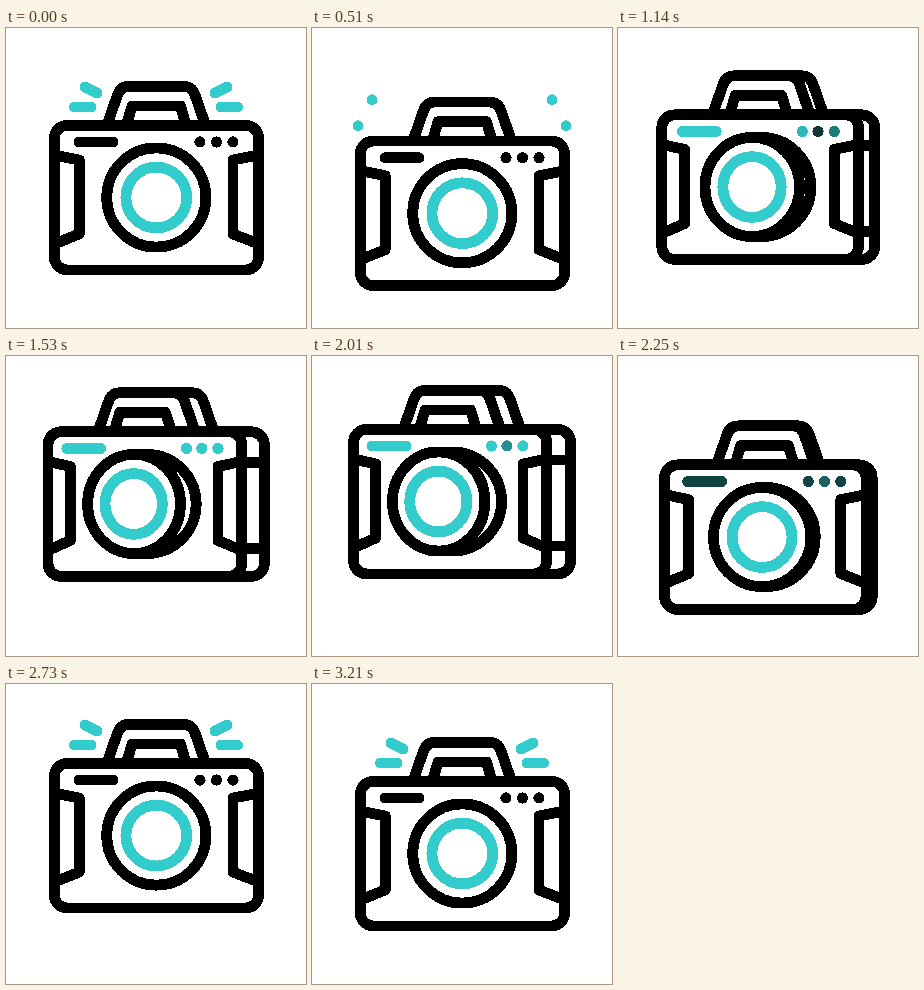
An HTML page that plays this animation: 300 by 300 pixels, repeating every 3.54 s.

```html
<!DOCTYPE html>
<html lang="en">
<head>
<meta charset="utf-8">
<title>Camera</title>
<style>
  html, body { margin: 0; width: 100%; height: 100%; overflow: hidden; background: #fff; }
  svg { display: block; width: 100vw; height: 100vh; shape-rendering: crispEdges; }
  .ink { fill: none; stroke: #000; stroke-width: 10.8; stroke-linecap: round; stroke-linejoin: round; }
  .solid { fill: #fff; }
  .accent { stroke: #33cccc; }
</style>
</head>
<body>
<svg viewBox="0 0 300 300">
  <g id="flash"></g>
  <g id="camera">
    <path id="hoodBack" class="ink solid"/>
    <path id="hoodFront" class="ink solid"/>
    <path id="hoodInner" class="ink"/>
    <rect id="bodyBack" class="ink solid" y="97.3" height="144.6" rx="13"/>
    <path id="sideLines" class="ink"/>
    <rect id="bodyFront" class="ink solid" y="97.3" height="144.6" rx="13"/>
    <path id="panels" class="ink"/>
    <circle id="lensBack" class="ink solid" cy="169.5" r="49.6"/>
    <ellipse id="lensFront" class="ink solid" cy="169.5" ry="49.6"/>
    <ellipse id="lensInner" class="ink accent" cy="169.5" ry="30.4"/>
    <path id="bar" class="ink"/>
    <circle id="dot0" cy="114" r="5.6"/>
    <circle id="dot1" cy="114" r="5.6"/>
    <circle id="dot2" cy="114" r="5.6"/>
  </g>
</svg>
<script>
const LOOP = 3540, STEP = 30;
const SVG = 'http://www.w3.org/2000/svg';
const $ = id => document.getElementById(id);
const set = (id, attrs) => {
  for (const name in attrs) $(id).setAttribute(name, attrs[name]);
};

// Smooth interpolation through [time, value] keys that never overshoots them.
function track(keys) {
  const slope = i => (keys[i + 1][1] - keys[i][1]) / (keys[i + 1][0] - keys[i][0]);
  const tangent = i => {
    if (i === 0 || i === keys.length - 1) return 0;
    const a = slope(i - 1), b = slope(i);
    return a * b <= 0 ? 0 : 2 * a * b / (a + b);
  };
  return t => {
    const last = keys.length - 1;
    if (t <= keys[0][0]) return keys[0][1];
    if (t >= keys[last][0]) return keys[last][1];
    const i = keys.findIndex(k => k[0] > t) - 1;
    const [t0, v0] = keys[i], [t1, v1] = keys[i + 1];
    const h = t1 - t0, u = (t - t0) / h, u2 = u * u, u3 = u2 * u;
    return v0 * (2 * u3 - 3 * u2 + 1) + v1 * (3 * u2 - 2 * u3)
      + h * (tangent(i) * (u3 - 2 * u2 + u) + tangent(i + 1) * (u3 - u2));
  };
}

const lift = track([[300, 0], [570, 18], [810, 13], [1140, -10.5], [1350, -17.5], [1740, -24],
  [2010, -24], [2370, 24], [2430, 21], [2460, 17], [2715, -18], [2970, -9], [3210, 0]]);
const barGlow = track([[810, 0], [1140, 1], [2010, 1], [2400, 0]]);
const dotGlow = [
  track([[810, 0], [1140, 0.9], [1200, 1], [2010, 1], [2400, 0]]),
  track([[840, 0], [1140, 0.27], [1560, 1], [1740, 1], [2010, 0.7], [2460, 0.3], [2730, 0]]),
  track([[840, 0], [1140, 0.6], [1320, 1], [2010, 1], [2400, 0]])
];
const flyOuter = track([[300, 0], [510, 1], [540, 1.05]]);
const flyInner = track([[300, 0], [420, 0.4], [510, 1], [540, 1.05]]);
const grow = track([[2460, 0], [2700, 1]]);

const clamp = v => Math.max(0, Math.min(1, v));
const turn = t => t < 570 ? 0
  : t < 2010 ? clamp((18 - lift(t)) / 42)
  : t < 2370 ? clamp((24 - lift(t)) / 48) : 0;
const teal = k => `rgb(${51 * k},${204 * k},${204 * k})`;
const mix = (a, b, k) => a.map((v, i) => v + (b[i] - v) * k);

// Left-hand rays; each is mirrored to the right.
const rays = [
  { outer: [79, 59], inner: [91, 65], exit: [60, 56] },
  { outer: [68.5, 79], inner: [85, 79], exit: [46, 82] }
];
for (const ray of rays) {
  ray.paths = [0, 1].map(side => {
    const path = document.createElementNS(SVG, 'path');
    path.setAttribute('class', 'ink accent');
    if (side) path.setAttribute('transform', 'matrix(-1 0 0 1 300 0)');
    return $('flash').appendChild(path);
  });
}

function drawFlash(t) {
  const visible = t <= 540 || t >= 2460;
  $('flash').setAttribute('visibility', visible ? 'visible' : 'hidden');
  for (const { outer, inner, exit, paths } of rays) {
    const a = t < 1000 ? mix(outer, exit, flyOuter(t)) : mix(inner, outer, grow(t));
    const b = t < 1000 ? mix(inner, exit, flyInner(t)) : inner;
    for (const path of paths) path.setAttribute('d', `M${a}L${b}`);
  }
}

function hood(left, right) {
  return `M${left} 97L${left + 10.5} 67Q${left + 13.5} 58.3 ${left + 22} 58.3`
    + `H${right - 22}Q${right - 13.5} 58.3 ${right - 10.5} 67L${right} 97`;
}

function draw(t) {
  const p = turn(t), y = lift(t);
  const at = (x, shift) => x + shift * p;
  const left = at(48.3, -6.7), right = at(252.7, -18), back = at(252.7, 6);
  const hoodLeft = at(101, -9.5);

  $('camera').setAttribute('transform', `translate(0 ${y})`);
  $('flash').setAttribute('transform', `translate(0 ${y})`);
  drawFlash(t);

  set('hoodBack', { d: hood(hoodLeft, at(199.5, 9)) });
  set('hoodFront', { d: hood(hoodLeft, at(199.5, -11)) });
  set('hoodInner', { d: `M${at(120.5, -13)} 97L${at(126, -13)} 78H${at(174.5, -16)}L${at(180, -15.5)} 97` });
  set('bodyBack', { x: left, width: back - left });
  set('bodyFront', { x: left, width: right - left });
  set('sideLines', { d: `M${right} 128H${back}M${right} 214H${back}` });

  const panelL = at(73.2, -9.5), panelR = at(227, -16);
  set('panels', {
    d: `M${left} 127L${panelL} 132V206L${left} 216M${right} 127L${panelR} 132V206L${right} 216`
  });

  const lensLeft = at(100.7, -20.3), lensRight = at(199.9, -27);
  set('lensBack', { cx: at(150.3, -10.3) });
  set('lensFront', { cx: (lensLeft + lensRight) / 2, rx: (lensRight - lensLeft) / 2 });
  set('lensInner', { cx: at(150.3, -24), rx: at(30.4, -1.8) });

  set('bar', { d: `M${at(73, -13)} 114H${at(107, -13)}`, style: `stroke:${teal(barGlow(t))}` });
  [[194, -14.5], [210.5, -15.5], [227, -16]].forEach(([x, shift], i) =>
    set('dot' + i, { cx: at(x, shift), fill: teal(dotGlow[i](t)) }));
}

const start = performance.now();
function tick() {
  const t = (performance.now() - start) % LOOP;
  draw(Math.floor(t / STEP) * STEP);
  requestAnimationFrame(tick);
}
tick();
</script>
</body>
</html>
```
